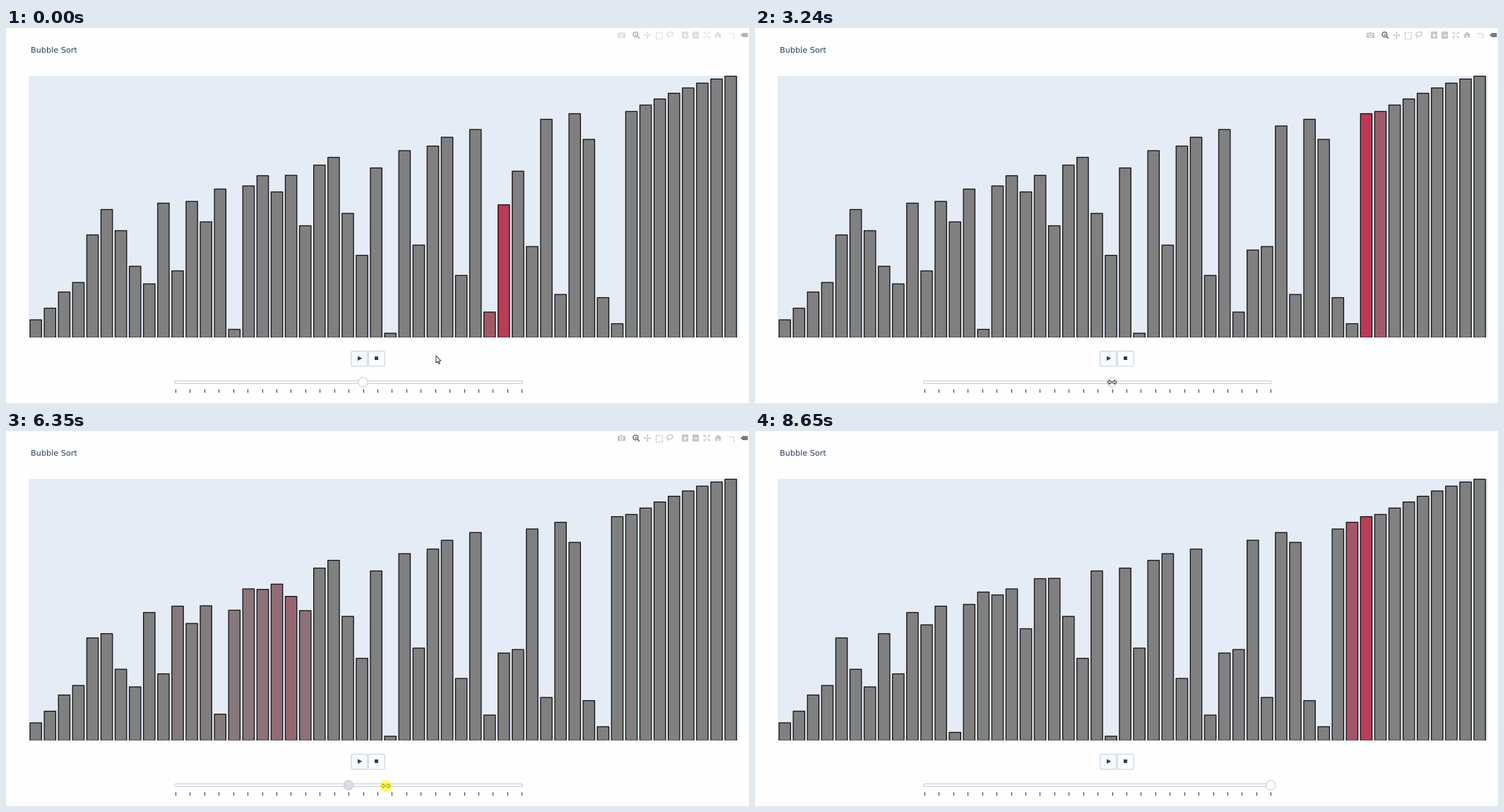
Recreate the animation shown at these times as a matplotlib script. Size 1052 by 532 pixels, loop 8.73 s.

```python
import numpy as np
import matplotlib.pyplot as plt
from matplotlib.animation import FuncAnimation
from matplotlib.collections import LineCollection, PolyCollection
from matplotlib.patches import Circle, Ellipse, FancyBboxPatch, Polygon

plt.rcParams["text.hinting"] = "none"

W, H, DPI = 1052, 532, 100
STEP, LOOP = 30, 8730
PX = 72 / DPI
PAPER, INK, BORDER, TINT = "#fefefe", "#2a3f5f", "#bec8d9", "#f4faff"
ICON, ACTIVE = "#c7c7c7", "#7c7c7c"
GRAY = np.array([128, 128, 128]) / 255
CRIMSON = np.array([220, 20, 60]) / 255
BASE, PITCH, BAR = 439.3, 20.08, 16.3

# The data being sorted, as bar tops; the sorted tail is a smooth ramp
UNSORTED = [414, 397.5, 374.5, 361, 293.5, 257.5, 287.5, 338, 363, 248.5,
            344.5, 246, 275, 228.5, 427.5, 224, 209.5, 232.5, 209, 280.5,
            194.5, 183.5, 263, 322.5, 198.5, 433, 174, 308, 167.5, 155,
            351, 144, 403, 139, 315, 310, 129.5, 378, 121.5, 158, 382.5, 419.5]
TOPS = UNSORTED + list(68.4 + 50 * np.linspace(1, 0, 8) ** 1.3)
N = len(TOPS)

FIRST_KEY, FIRST_TIME = 33, -34
STOP, RESUME = 1480, 2741
GRAB, RELEASE = 3460, 7660
RUSHES = [(3920, 4270), (6053.5, LOOP)]   # a moving slider forces the pace
RUSH_GAP = 32.73

# Pointer legs: start, end, x, y
LEGS = [(0, 940, 508, 472), (1040, 1180, 525, 472), (1990, 2220, 500, 470),
        (2850, 3180, 505.5, 502.5), (3480, 4240, 245, 503.5),
        (5850, 6340, 538, 503.5), (6350, 6700, 744, 513), (7700, 8350, 764, 540)]

ARROW = np.array([(0, 0), (0, 10), (2.4, 7.9), (3.9, 11.5), (5.5, 10.8),
                  (4, 7.3), (7, 7.1)])
HAND = np.array([(-1, 0), (1.3, 0), (1.3, 4.5), (7, 6.3), (6, 12.5),
                 (-.5, 12.5), (-4, 7), (-1, 8)])
HEAD = np.array([(3.2, -1.1), (3.2, -3.2), (6.5, 0), (3.2, 3.2), (3.2, 1.1)])
RESIZE = np.r_[HEAD, -HEAD]


def ease(u):
    u = min(max(u, 0), 1)
    return 4 * u ** 3 if u < .5 else 1 - 4 * (1 - u) ** 3


def slider_step(t):
    """Speed setting, dragged from 13 down to 0 and then up to 24."""
    if t < 5500:
        return int(np.clip(13 - (t - 3533) // 56.6, 0, 13))
    return int(np.clip((t - 5870) // 38.5, 0, 24))


def delay(t):
    return 500 - 20.25 * slider_step(t)


def next_time(t):
    if any(a <= t < b for a, b in RUSHES):
        return t + RUSH_GAP
    after = t + delay(t)
    if STOP < after < RESUME:
        return RESUME
    return min([after] + [a for a, _ in RUSHES if a > t])


def blend(move, t):
    start, length, old, new = move
    return old + (new - old) * ease((t - start) / length)


def build_moves():
    """Every sort step as (start, length, old state, new state)."""
    tops, glow = list(TOPS), np.eye(N)
    t, k = FIRST_TIME, FIRST_KEY
    now = np.array([tops, glow[k - 1]])
    moves = []
    while t < LOOP:
        if moves:
            now = blend(moves[-1], t)
        if tops[k] < tops[k + 1]:
            tops[k], tops[k + 1] = tops[k + 1], tops[k]
        moves.append((t, np.clip(delay(t), 20, 80), now, np.array([tops, glow[k]])))
        t, k = next_time(t), (k + 1) % (N - 1)
    return moves


MOVES = build_moves()
STARTS = [m[0] for m in MOVES]


def pointer_at(t):
    x, y = 610, 465
    for start, end, to_x, to_y in LEGS:
        f = np.clip((t - start) / (end - start), 0, 1)
        x, y = x + (to_x - x) * f, y + (to_y - y) * f
    return x, y


fig = plt.figure(figsize=(W / DPI, H / DPI), dpi=DPI, facecolor=PAPER)
ax = fig.add_axes([0, 0, 1, 1])
ax.set_xlim(0, W)
ax.set_ylim(H, 0)
ax.axis("off")


def poly(pts, fc="none", ec="none", lw=0, closed=True, **kw):
    return ax.add_patch(Polygon(pts, closed=closed, fc=fc, ec=ec, lw=lw * PX, **kw))


def box(x0, y0, x1, y1, fc, **kw):
    return poly([(x0, y0), (x1, y0), (x1, y1), (x0, y1)], fc, **kw)


def line(pts, color=ICON, lw=1.2, **kw):
    return poly(pts, ec=color, lw=lw, closed=False, **kw)


def disc(x, y, r, fc="none", ec="none", lw=0, **kw):
    return ax.add_patch(Circle((x, y), r, fc=fc, ec=ec, lw=lw * PX, **kw))


def rounded(x0, y0, x1, y1, r, fc):
    return ax.add_patch(FancyBboxPatch(
        (x0, y0), x1 - x0, y1 - y0, fc=fc, ec=BORDER, lw=.9 * PX,
        boxstyle=f"round,pad=0,rounding_size={r}"))


def plus(x, y, r, color, lw):
    line([(x - r, y), (x + r, y)], color, lw)
    line([(x, y - r), (x, y + r)], color, lw)


def draw_toolbar():
    y = 10
    # camera
    box(866, 7, 876.8, 14, ICON)
    box(869.2, 5.6, 873.4, 7.2, ICON)
    disc(871.4, 10.3, 2.6, PAPER)
    disc(871.4, 10.3, 1.5, ICON)
    # zoom
    disc(891.4, 9.2, 3.4, ec=ACTIVE, lw=1.7)
    line([(894, 11.8), (897, 14.6)], ACTIVE, 2)
    plus(891.4, 9.2, 1.6, ACTIVE, 1)
    # pan
    plus(908.2, y, 4, ICON, 1.2)
    for a in np.arange(4) * np.pi / 2:
        out, side = np.array([np.cos(a), np.sin(a)]), np.array([-np.sin(a), np.cos(a)])
        poly((908.2, y) + np.array([5.2 * out, 3 * out + 2 * side, 3 * out - 2 * side]), ICON)
    # box and lasso select
    box(919.6, 5.5, 928.8, 14.5, "none", ec=ICON, lw=1.4, ls=(0, (1.6, 1)))
    ax.add_patch(Ellipse((940, 8.6), 9, 5.6, angle=-12, fc="none", ec=ICON, lw=1.3 * PX))
    line([(936.4, 10.6), (937.6, 12), (937, 14.5)])
    # zoom in and out
    for x in (961.1, 976.6):
        box(x - 4.6, y - 4.6, x + 4.6, y + 4.6, ICON)
    plus(961.1, y, 2.6, PAPER, 1.4)
    line([(974, y), (979.2, y)], PAPER, 1.4)
    # autoscale
    for sx in (-1, 1):
        for sy in (-1, 1):
            corner = np.array([(1, 1), (4, 4), (4.6, 4.6), (1.8, 4.6), (4.6, 1.8)])
            pts = (992.3, y) + corner * (sx, sy)
            line(pts[:2])
            poly(pts[2:], ICON)
    # home
    poly([(1008.2, 5.2), (1013.4, 10.2), (1003, 10.2)], ICON)
    box(1004.4, 10, 1012, 14.4, ICON)
    box(1007.1, 11.4, 1009.3, 14.5, PAPER)
    # spikes and hover tag
    for end in ((1023.5, 7.6), (1030.6, 14.5)):
        line([end, (1030.6, 7.6)], lw=1.5, ls=(0, (1.5, .8)))
    poly([(1040, y), (1043.2, 7), (1050.4, 7), (1050.4, 13), (1043.2, 13)], ACTIVE)


draw_toolbar()
toolbar_cover = box(860, 0, W, 20, PAPER)
ax.text(35, 34.6, "Bubble Sort", family="DejaVu Sans", size=11.3 * PX, color=INK)

box(32, 67.8, 1038, BASE, "#e5ecf6")
bars = PolyCollection([], edgecolors="#111111", linewidths=1.3 * PX, zorder=1, snap=False)
ax.add_collection(bars, autolim=False)
box(32, BASE, 1038, BASE + 2, PAPER)

play = rounded(488.8, 458.4, 511.8, 480, 2, TINT)
stop = rounded(513.2, 458.4, 536.3, 480, 2, PAPER)
poly([(498, 465.4), (504.2, 468.7), (498, 472)], INK)
box(522.3, 466.2, 527.2, 471.1, INK)

rounded(238.6, 500.6, 731.6, 504.4, 1.8, "#f8fafc")
ticks = 240 + 20.43 * np.arange(25)
ax.add_collection(LineCollection([[(x, 512.4), (x, 516.8)] for x in ticks], zorder=1,
                                 colors="#333333", linewidths=PX), autolim=False)
knob = disc(505.6, 502.5, 6.7, PAPER, BORDER, .9)

pointer = poly(ARROW, "white", "#222222", .9)
halo = disc(0, 0, 8.5, "#ffff00", alpha=.58)
box(0, 526, W, H, PAPER)

LEFT = 34.05 + PITCH * np.arange(N)
FLOOR = np.full(N, BASE)


def draw(i):
    t = i * STEP + 10
    tops, glow = blend(MOVES[np.searchsorted(STARTS, t, side="right") - 1], t)
    bars.set_verts(np.stack([np.c_[LEFT, FLOOR], np.c_[LEFT, tops],
                             np.c_[LEFT + BAR, tops], np.c_[LEFT + BAR, FLOOR]], axis=1))
    bars.set_facecolor(GRAY + (CRIMSON - GRAY) * glow[:, None])

    x, y = pointer_at(t)
    on_row = 458 < y < 480
    on_play, on_stop = on_row and 488 < x < 512, on_row and 513 < x < 537
    on_slider = 232 < x < 740 and abs(y - 502.5) < 10.5
    shape = HAND if on_play or on_stop else RESIZE if on_slider else ARROW
    pointer.set_xy(shape + (x, y))
    dragging = GRAB <= t < RELEASE
    clicking = any(0 <= t - click < 100 for click in (STOP - 40, RESUME - 60))
    halo.center = x, y
    halo.set_visible(dragging or clicking)

    stopped = STOP <= t < RESUME
    play.set_facecolor(TINT if on_play or not stopped else PAPER)
    stop.set_facecolor(TINT if on_stop or stopped else PAPER)
    knob.center = ticks[slider_step(t)], 502.5
    knob.set_facecolor("#dbdde0" if dragging else PAPER)
    toolbar_cover.set_alpha(1 - np.interp(t, [10, 220, 8350, 8650], [.55, 1, 1, 0]))
    return ()


anim = FuncAnimation(fig, draw, frames=LOOP // STEP, interval=STEP,
                     init_func=lambda: draw(0), repeat=True, cache_frame_data=False)
plt.show()
```
